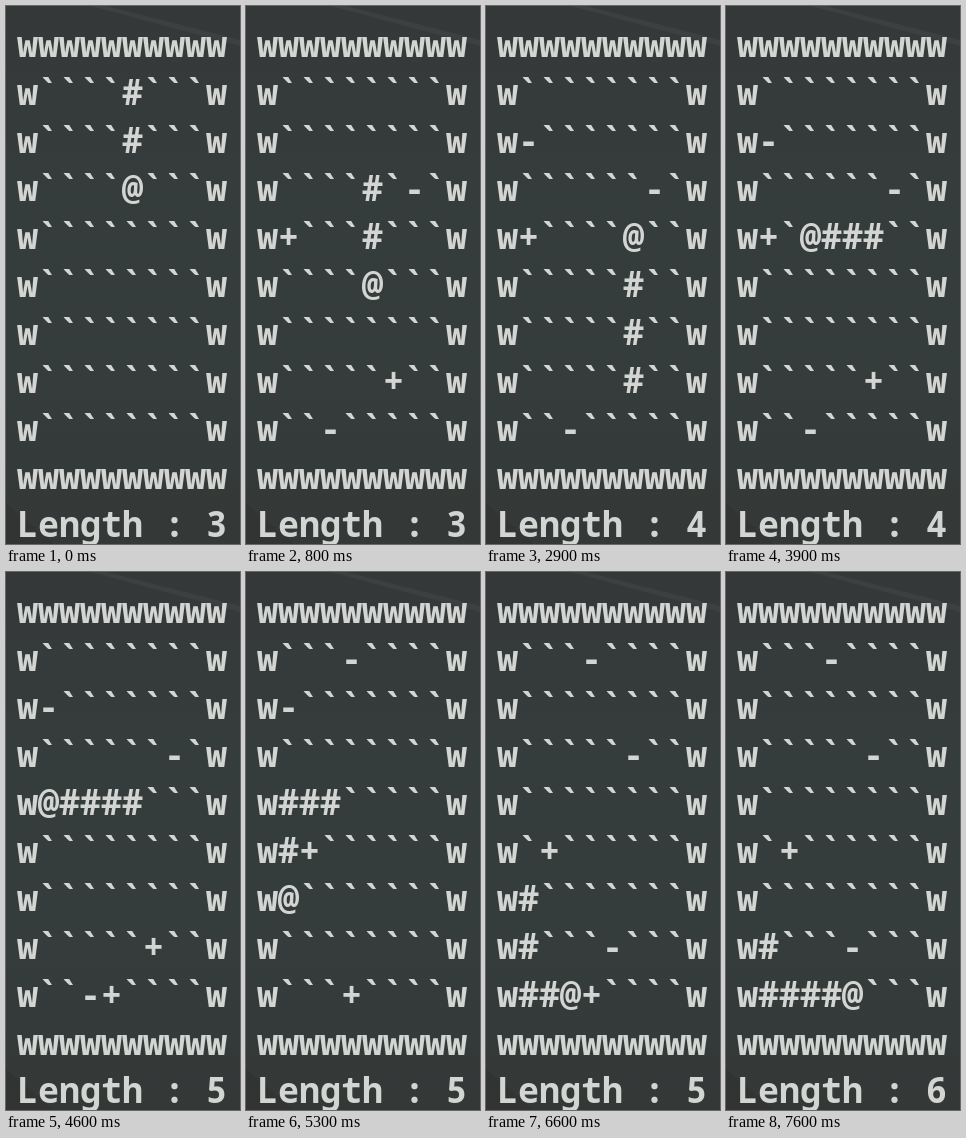
An HTML page with a canvas that plays this animation: 234 by 538 pixels, repeating every 8 s.

```html
<!DOCTYPE html>
<html lang="en">
<head>
<meta charset="utf-8">
<title>Terminal snake</title>
<style>
html, body { margin: 0; width: 100%; height: 100%; overflow: hidden; background: #353b3b; }
canvas { display: block; }
</style>
</head>
<body>
<canvas id="stage" width="234" height="538"></canvas>
<script>
const LOOP = 8000;
const CELL = 21, LINE = 48, LEFT = 11, BASE = 51;
const ctx = document.getElementById('stage').getContext('2d');

// Time of each step, and the direction the head takes in it
const steps = [400, 800, 1100, 1500, 1900, 2300, 2600, 2900, 3300, 3600, 3900,
  4200, 4600, 4900, 5300, 5500, 5900, 6300, 6600, 6900, 7600];
const moves = 'DDDDRUUULLLLLDDDDRRRR';
const meals = [1900, 4600, 6900];
const dirs = { U: [-1, 0], D: [1, 0], L: [0, -1], R: [0, 1] };

// Symbol, row, column, visible from, visible until
const items = [
  ['-', 3, 7, 400, 5300],
  ['+', 7, 6, 400, 5300],
  ['+', 4, 1, 800, 5300],
  ['-', 8, 3, 800, 5300],
  ['-', 2, 1, 1100, 6300],
  ['+', 8, 4, 4600, LOOP],
  ['-', 1, 4, 5300, LOOP],
  ['+', 5, 2, 5300, LOOP],
  ['-', 3, 6, 5500, LOOP],
  ['-', 7, 5, 6300, LOOP]
];

function snakeAt(t) {
  const trail = [[1, 5], [2, 5], [3, 5]];
  steps.forEach((at, i) => {
    if (at > t) return;
    const [r, c] = trail[trail.length - 1];
    const [dr, dc] = dirs[moves[i]];
    trail.push([r + dr, c + dc]);
  });
  const length = 3 + meals.filter(at => at <= t).length;
  return trail.slice(-length);
}

function linesAt(t) {
  const wall = 'w'.repeat(10);
  const grid = Array.from({ length: 10 }, (_, r) =>
    [...(r % 9 ? 'w' + '`'.repeat(8) + 'w' : wall)]);
  for (const [sym, r, c, from, to] of items) {
    if (t >= from && t < to) grid[r][c] = sym;
  }
  const snake = snakeAt(t);
  snake.forEach(([r, c], i) => {
    grid[r][c] = i === snake.length - 1 ? '@' : '#';
  });
  return [...grid, [...('Length : ' + snake.length)]];
}

function polygon(color, ...points) {
  ctx.fillStyle = color;
  ctx.beginPath();
  points.forEach(([x, y]) => ctx.lineTo(x, y));
  ctx.fill();
}

function drawBackdrop() {
  const shade = ctx.createLinearGradient(0, 0, 0, 538);
  shade.addColorStop(0, '#353839');
  shade.addColorStop(0.3, '#353c3c');
  shade.addColorStop(0.7, '#353c3c');
  shade.addColorStop(1, '#343837');
  ctx.fillStyle = shade;
  ctx.fillRect(0, 0, 234, 538);
  polygon('rgba(70, 72, 72, 0.5)', [85, 0], [100, 0], [234, 34], [234, 40]);
  polygon('rgba(48, 48, 48, 0.45)', [0, 497], [48, 538], [0, 538]);
}

function draw(t) {
  drawBackdrop();
  ctx.font = '600 35px "Noto Sans Mono", monospace';
  ctx.fillStyle = '#d3d5d2';
  linesAt(t).forEach((line, r) => line.forEach((ch, c) =>
    ctx.fillText(ch, LEFT + c * CELL, BASE + r * LINE)));
}

function tick() {
  draw(performance.now() % LOOP);
  requestAnimationFrame(tick);
}
tick();
</script>
</body>
</html>
```
